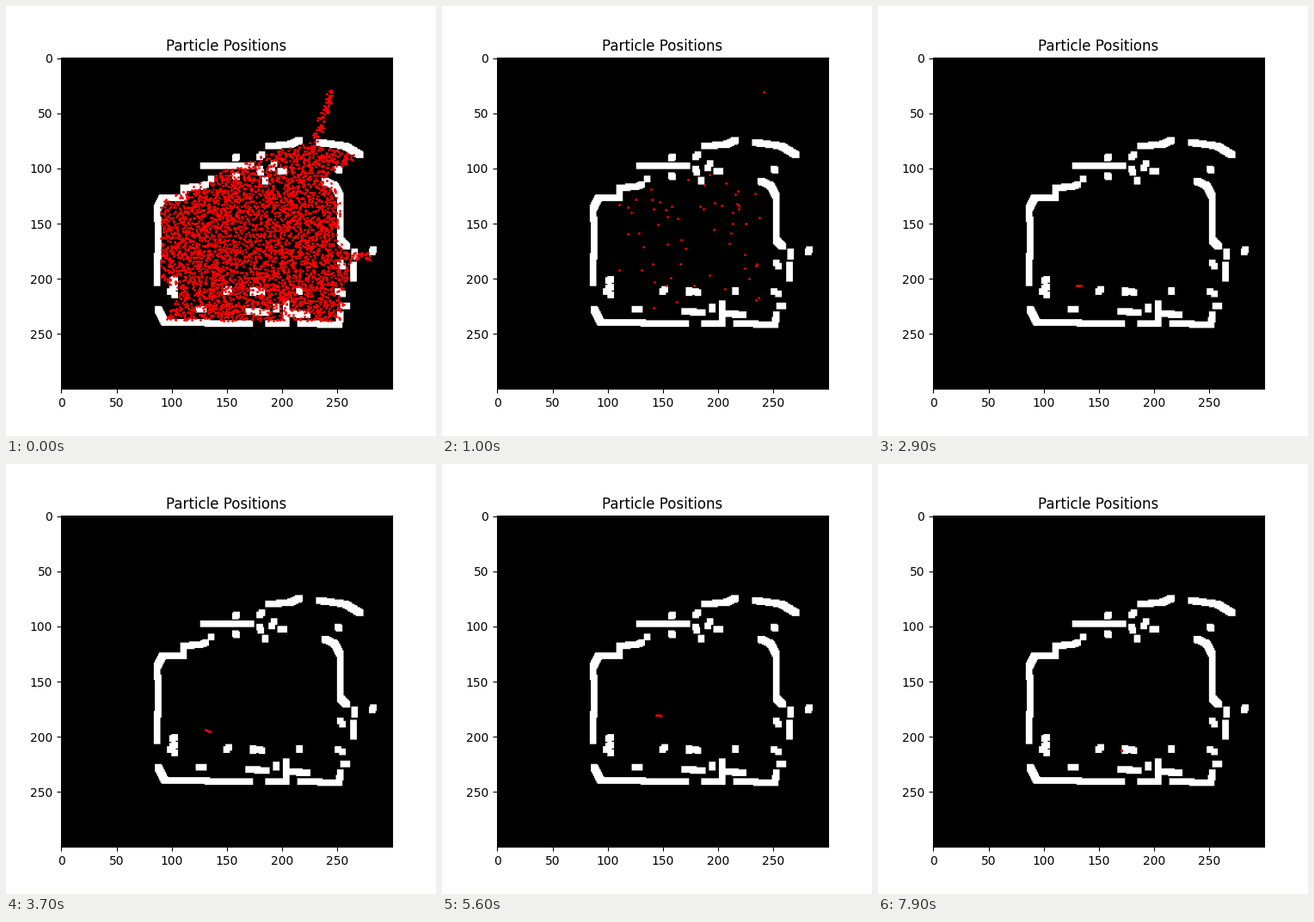
Recreate the animation shown at these times as a matplotlib script. Size 500x500 px, loop 8000 ms.

```python
import numpy as np
import matplotlib.pyplot as plt
from matplotlib.animation import FuncAnimation
from matplotlib.path import Path

SIZE, FRAMES, INTERVAL = 300, 80, 100
SPREAD_FRAME, MERGED_FRAME = 8, 15
rng = np.random.default_rng(7)

# Long wall strokes; small obstacles are clumps around single points.
WALLS = [
    [(188, 79), (207, 78), (216, 74)],
    [(234, 76), (257, 79), (271, 87)],
    [(129, 97), (172, 97)],
    [(126, 116), (111, 117), (111, 126), (92, 126), (87, 136), (88, 155), (87, 203)],
    [(88, 227), (94, 239), (171, 240)],
    [(188, 240), (204, 240), (204, 222)],
    [(217, 240), (252, 241), (253, 232)],
    [(239, 111), (248, 115), (253, 125), (253, 165), (259, 170)],
    [(170, 229), (186, 230)], [(209, 231), (223, 232)], [(265, 187), (265, 199)],
]
CLUMPS = [
    (157, 88), (180, 88), (182, 101), (191, 97), (187, 110), (200, 103),
    (157, 107), (136, 109), (129, 113), (102, 199), (101, 209), (101, 213),
    (152, 211), (172, 210), (180, 211), (217, 211), (127, 229), (193, 226),
    (251, 102), (265, 177), (253, 186), (253, 211), (258, 223), (283, 175),
]
ROOM = np.array([
    (90, 129), (137, 108), (150, 100), (200, 82), (225, 76), (270, 89),
    (242, 105), (252, 125), (253, 165), (262, 180), (254, 238), (92, 238),
    (107, 215), (90, 198)])
ROOM_CENTRE = np.array([172, 165])

# Key points of the merged cluster's path: frame, x, y.
TRACK = np.array([(15, 139, 225), (29, 131.5, 206), (45, 134, 183),
                  (52, 142, 174), (67, 156.7, 198), (79, 170, 212.5)])


def stamp(grid, x, y):
    x, y = round(x), round(y)
    grid[y - 2:y + 4, x - 3:x + 3] = 1


def draw_walls():
    grid = np.zeros((SIZE, SIZE))
    for line in WALLS:
        for start, end in zip(line, line[1:]):
            for x, y in np.linspace(start, end, 60):
                stamp(grid, x, y)
    for x, y in CLUMPS:
        for dx, dy in rng.integers(-2, 3, (2, 2)):
            stamp(grid, x + dx, y + dy)
    return grid


def fill(corners, count):
    pts = rng.uniform(70, 275, (count * 5, 2))
    return pts[Path(corners).contains_points(pts)][:count]


def beam(count):
    t = rng.uniform(0, 1, count)
    x = 227 + 18 * t ** .7 + rng.normal(0, 2, count)
    return np.column_stack([x, 76 - 48 * t])


walls = draw_walls()

body = fill(ROOM, 4700)
on_wall = walls[body[:, 1].astype(int), body[:, 0].astype(int)] > 0
body = body[~on_wall | (rng.random(len(body)) < .4)]
spur = rng.uniform((261, 176), (280, 183), (34, 2))
crowd = np.vstack([body, beam(70), spur])

winner = np.array([[142, 227]])
inner = ROOM_CENTRE + .83 * (ROOM - ROOM_CENTRE)
sparse = np.vstack([winner, rng.permutation(np.vstack([fill(inner, 400), beam(15)]))])
headings = rng.uniform(0, 2 * np.pi, len(sparse))
drift = 1.5 * np.column_stack([np.cos(headings), np.sin(headings)])
drift[0] = (TRACK[0, 1:] - winner[0]) / (MERGED_FRAME - SPREAD_FRAME)


def cluster(frame):
    """A short dash that tilts as it travels and shrinks to a dot."""
    x, y = (np.interp(frame, TRACK[:, 0], col) for col in TRACK[:, 1:].T)
    t = (frame - MERGED_FRAME) / (FRAMES - 1 - MERGED_FRAME)
    reach = 2.2 * max(0, np.sin(np.pi * (.05 + .95 * t))) ** .4
    tilt = .4 * np.sin(2 * np.pi * (t - .22))
    offsets = reach * np.linspace(-1, 1, 4)
    return np.column_stack([x + offsets, y + tilt * offsets])


def particles(frame):
    if frame < SPREAD_FRAME:
        return crowd
    if frame < MERGED_FRAME:
        age = frame - SPREAD_FRAME
        alive = max(1, round(len(sparse) * .38 ** age))
        return sparse[:alive] + drift[:alive] * age
    return cluster(frame)


fig, ax = plt.subplots(figsize=(5, 5), dpi=100)
ax.imshow(walls, cmap="gray")
ax.set_title("Particle Positions")
ax.set_xlim(-.5, SIZE - .5)
ax.set_ylim(SIZE - .5, -.5)
dots, = ax.plot([], [], "ro", markersize=1)


def update(frame):
    dots.set_data(*particles(frame).T)
    return dots,


anim = FuncAnimation(fig, update, frames=FRAMES, interval=INTERVAL,
                     repeat=True, repeat_delay=0)
plt.show()
```
